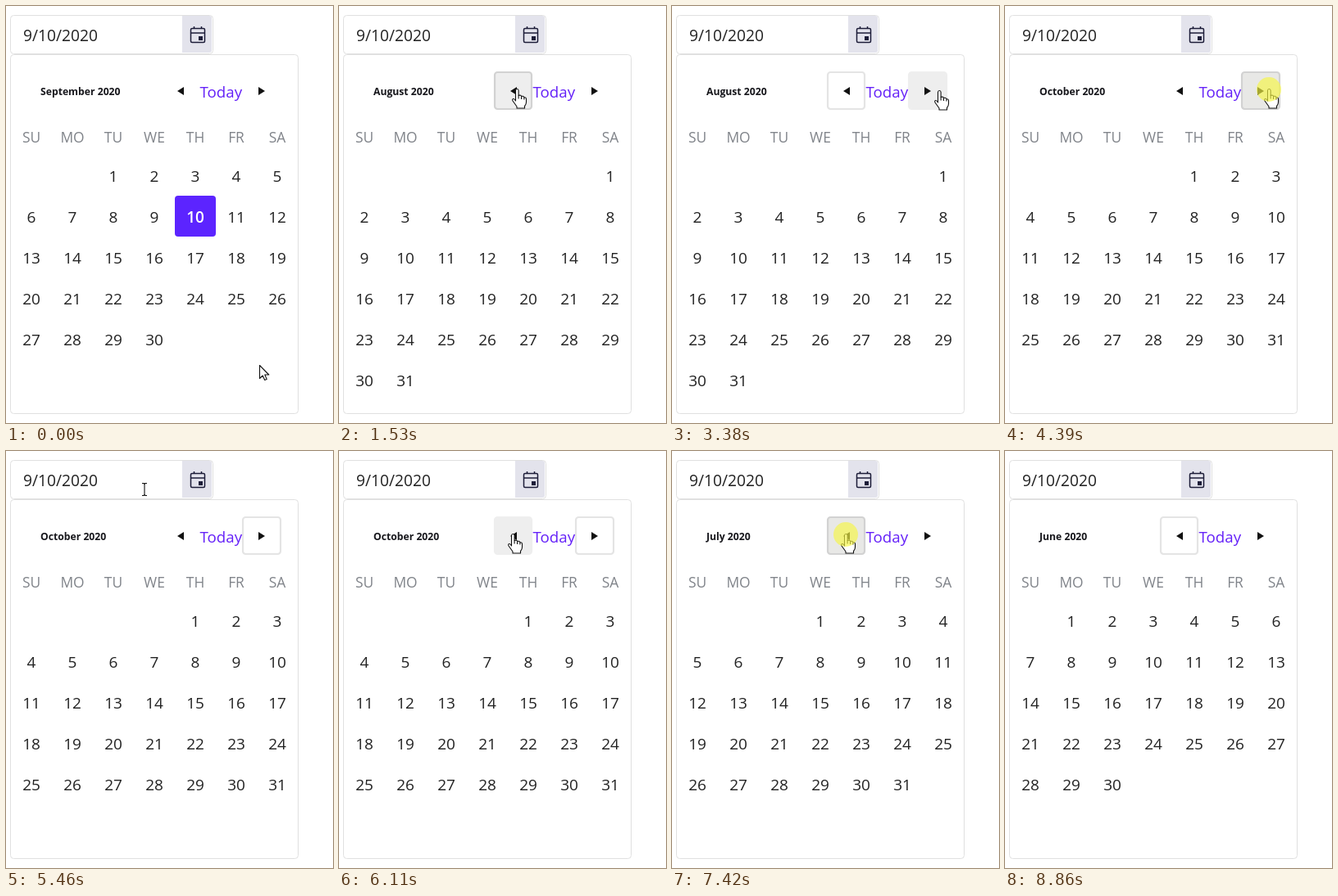
An HTML page that plays this animation: 399 by 510 pixels, repeating every 9520 ms.

```html
<!DOCTYPE html>
<html lang="en">
<head>
<meta charset="utf-8">
<title>Date picker</title>
<style>
  html, body { margin: 0; width: 100%; height: 100%; overflow: hidden; background: #fff; }
  svg { display: block; width: 100vw; height: 100vh; font: 19px "Open Sans", "Noto Sans", sans-serif; fill: #222; }
  .box { fill: #fff; stroke: #e0e0e0; }
  .center { text-anchor: middle; }
  .weekday { font-size: 17.4px; fill: #80848a; }
  #title { font-size: 12.2px; font-weight: 700; fill: #17171c; }
  #today { font-size: 18.7px; fill: #6420f8; }
  .cursor { fill: #fff; stroke: #111; stroke-width: 1.1; stroke-linejoin: round; }
</style>
</head>
<body>
<svg viewBox="0 0 399 510">
  <rect class="box" x="5.5" y="11.5" width="247" height="47" rx="4"/>
  <path d="M215 12H248Q251 12 251 15V54Q251 57 248 57H215Z" fill="#e3e3ec"/>
  <text x="21" y="43" font-size="19.2">9/10/2020</text>
  <g fill="none" stroke="#1c1c38" stroke-width="1.5">
    <rect x="225.500" y="27.500" width="17" height="17" rx="1.5"/>
    <path d="M226 33H242M229.500 25V28M238.500 25V28"/>
    <path d="M235 37H240V42H235Z" fill="#1c1c38" stroke="none"/>
  </g>

  <rect class="box" x="5.5" y="59.5" width="351" height="439" rx="4"/>
  <text id="title" x="42" y="109"></text>
  <rect id="prev" x="190" y="81" width="45" height="45" rx="3.5" stroke-width="2.2"/>
  <rect id="next" x="289" y="81" width="46" height="45" rx="3.5" stroke-width="2.2"/>
  <path d="M209 104L217 99V109Z M316 104L308 99V109Z" fill="#111"/>
  <text id="today" x="236.5" y="111.500">Today</text>
  <rect id="selected" x="206" y="232" width="50" height="50" rx="4" fill="#5c24ff"/>
  <g id="grid"></g>

  <g id="pointer" class="cursor">
    <path id="arrow" d="M.5 .5V16.500L4.200 13L6.700 18.500L9.200 17.400L6.800 12H11.800Z"/>
    <g id="hand" transform="translate(-.5 -1.5)">
      <path d="M-2 2Q-2 0 -.2 0Q1.600 0 1.600 2V8Q4.600 7 5 9Q8 8.300 8.400 10.300Q11 10 11 12.500V16Q11 19 9 21V23.500H-.5V21.500L-5.500 14.500Q-6.500 12 -4.500 12Q-3.500 12 -2 14.500Z"/>
      <path d="M1.600 8V12M5 9V12.500M8.400 10.300V13" fill="none"/>
    </g>
    <path id="beam" d="M-3 -7.500H-1L0 -6.500L1 -7.500H3M0 -6.500V6.500M-3 7.500H-1L0 6.500L1 7.500H3" fill="none"/>
    <circle id="halo" cx="-1" cy="-1" r="15" fill="#f6f644" stroke="none" opacity=".66"/>
  </g>
</svg>
<script>
const LOOP = 9520;
const STEP = 107;           // the pointer moves in steps of this length
const RESPONSE = 110;       // from press to month change
const PRESS = 220;
const POINTER_LEAVES = 8860;
const START_MONTH = 9;
const BUTTONS = { prev: -1, next: 1 };
const $ = id => document.getElementById(id);

const clicks = [
  { at: 1310, button: "prev", quiet: true },
  { at: 3600, button: "next" },
  { at: 4240, button: "next" },
  { at: 6210, button: "prev" },
  { at: 6330, button: "prev" },
  { at: 6880, button: "prev" },
  { at: 7420, button: "prev" }
];

// Each gesture continues from the end of the one before, through a few key points.
const gestures = [
  { from: 0, to: 0, via: [[309, 439]] },
  { from: 100, to: 880, via: [[214, 104]] },
  { from: 1310, to: 1530, via: [[218, 103]] },
  { from: 2290, to: 3150, via: [[168, 66], [316, 112], [215, 105]] },
  { from: 3260, to: 3380, via: [[327, 105]] },
  { from: 3600, to: 3600, via: [[323, 103]] },
  { from: 4600, to: 5000, via: [[328, 106]] },
  { from: 5220, to: 5460, via: [[356, 143], [169, 47]] },
  { from: 5560, to: 6110, via: [[158, 80], [213, 103]] },
  { from: 7960, to: 7960, via: [[262, 137]] },
  { from: 8100, to: 8860, via: [[316, 211], [140, 33]] }
];

function addText(x, y, className, content = "") {
  const text = document.createElementNS("http://www.w3.org/2000/svg", "text");
  text.setAttribute("x", x);
  text.setAttribute("y", y);
  text.setAttribute("class", className);
  text.textContent = content;
  $("grid").append(text);
  return text;
}

const columnX = column => 31 + 50 * column;
["SU", "MO", "TU", "WE", "TH", "FR", "SA"].forEach((name, i) => addText(columnX(i), 167, "center weekday", name));
const cells = Array.from({ length: 42 }, (_, i) => addText(columnX(i % 7), 215 + 50 * Math.floor(i / 7), "center"));

const show = (id, visible) => $(id).setAttribute("visibility", visible ? "visible" : "hidden");
const ease = u => u * u * (3 - 2 * u);
const mix = (a, b, u) => a + (b - a) * u;

function pointerAt(t) {
  const index = gestures.findLastIndex(gesture => gesture.from <= t);
  const { from, to, via } = gestures[index];
  const origin = index ? gestures[index - 1].via.at(-1) : via[0];
  const steps = Math.round((to - from) / STEP) + 1;
  const progress = Math.min(1, (Math.floor((t - from) / STEP) + 1) / steps);
  const along = ease(progress) * via.length;
  const leg = Math.min(via.length - 1, Math.floor(along));
  const start = leg ? via[leg - 1] : origin;
  return start.map((value, axis) => Math.round(mix(value, via[leg][axis], along - leg)));
}

function targetAt([x, y]) {
  if (y < 59 && x < 215) return "field";
  if (y < 80 || y > 127 || x < 189 || x > 336) return "";
  return x < 236 ? "prev" : x < 288 ? "today" : "next";
}

let shownMonth;
function drawMonth(month) {
  if (month === shownMonth) return;
  shownMonth = month;
  const first = new Date(2020, month - 1, 1);
  const dayCount = new Date(2020, month, 0).getDate();
  $("title").textContent = first.toLocaleString("en-US", { month: "long" }) + " 2020";
  cells.forEach((cell, i) => {
    const day = i - first.getDay() + 1;
    const selected = month === START_MONTH && day === 10;
    cell.textContent = day > 0 && day <= dayCount ? day : "";
    cell.setAttribute("fill", selected ? "#fff" : "#222");
    cell.setAttribute("font-weight", selected ? 600 : 400);
  });
  show("selected", month === START_MONTH);
}

function drawButton(id, hovered, focused, pressed) {
  const fill = hovered ? (pressed ? "#e8e8e6" : "#eee") : "#fff";
  $(id).setAttribute("fill", fill);
  $(id).setAttribute("stroke", focused ? (hovered ? "#d2d2d2" : "#e4e4e4") : fill);
}

function draw(t) {
  const month = clicks
    .filter(click => click.at + RESPONSE <= t)
    .reduce((sum, click) => sum + BUTTONS[click.button], START_MONTH);
  drawMonth(month);

  const [x, y] = pointerAt(t);
  const visible = t < POINTER_LEAVES;
  const target = visible ? targetAt([x, y]) : "";
  const lastClick = clicks.findLast(click => click.at <= t);
  const pressed = lastClick && t < lastClick.at + PRESS;
  for (const id in BUTTONS) drawButton(id, target === id, lastClick?.button === id, pressed);

  $("pointer").setAttribute("transform", `translate(${x} ${y})`);
  show("hand", visible && target && target !== "field");
  show("beam", visible && target === "field");
  show("arrow", visible && !target);
  show("halo", pressed && !lastClick.quiet);
}

const start = performance.now();
function tick() {
  draw((performance.now() - start) % LOOP);
  requestAnimationFrame(tick);
}
tick();
</script>
</body>
</html>
```
